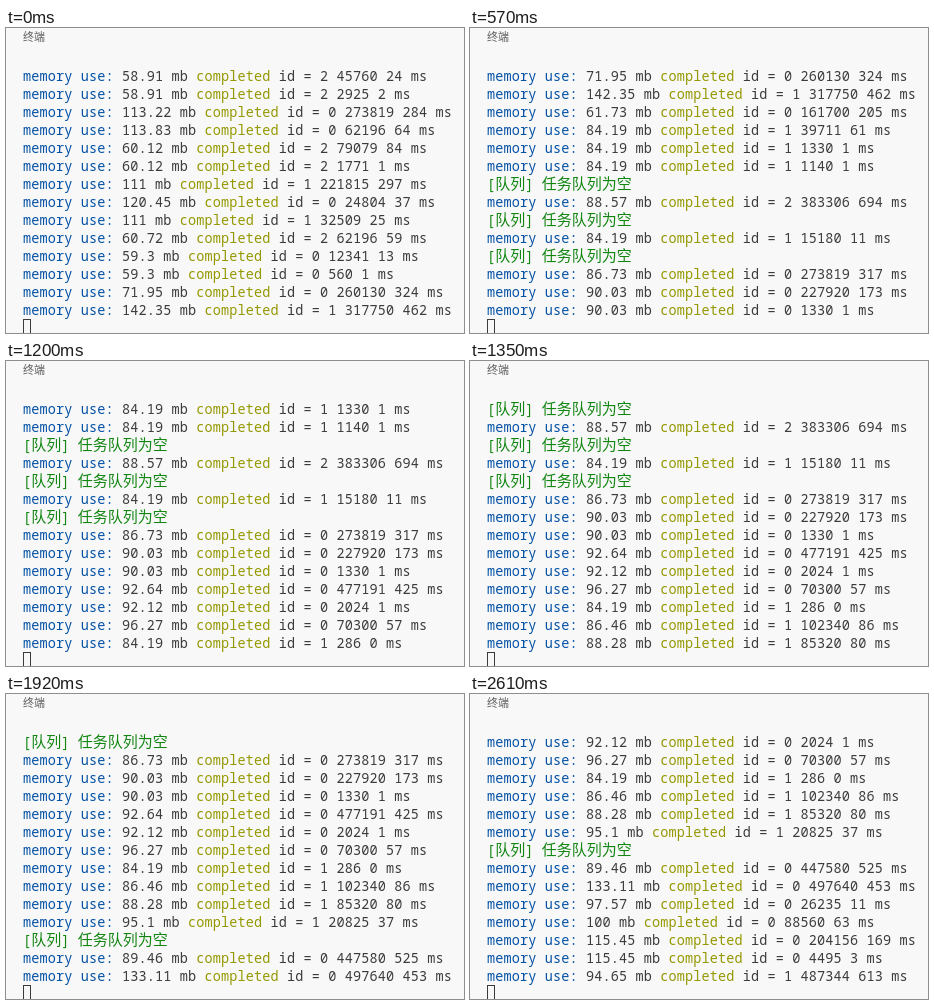
These frames come from a looping animation (458x305 px, 2.64 s). An HTML page with a canvas:

```html
<!DOCTYPE html>
<html lang="zh-CN">
<head>
<meta charset="utf-8">
<title>终端</title>
<style>
  html, body { margin: 0; width: 100%; height: 100%; overflow: hidden; background: #f8f8f8; }
  canvas { display: block; width: 458px; height: 305px; }
</style>
</head>
<body>
<canvas id="stage"></canvas>
<script>
const W = 458, H = 305, LOOP = 2640;
const LEFT = 17, CELL = 8.25, HAN_CELL = 15, ROW = 18, BASE = 53, ROWS = 14;
const SIZE = 13.5;
const MONO = SIZE + 'px "Noto Sans Mono", "DejaVu Sans Mono", monospace';
const HAN = '"Noto Sans CJK SC", "Noto Sans CJK", sans-serif';
const BACK = '#f8f8f8', INK = '#3b3b3b', TITLE = '#5c5c5c';
const BLUE = '#0451a5', OLIVE = '#949800', GREEN = '#118611';

const log = [];
const memory = {};
let now = 0;

const print = (...parts) => log.push({ time: now, parts });
const at = time => { now = time; };
const notice = () => print(['[队列] 任务队列为空', GREEN]);

// A job on n items tries every triple; small jobs take time in proportion.
const triples = n => n * (n - 1) * (n - 2) / 6;
const quickTime = n => Math.ceil(triples(n) / 1700 - 0.2);

// Jobs are [items, ms, mb]; a worker keeps its memory until told otherwise.
function worker(id, ...jobs) {
  for (const [n, ms = quickTime(n), mb = memory[id]] of jobs) {
    memory[id] = mb;
    print(['memory use: ', BLUE], [mb + ' mb ', INK], ['completed ', OLIVE],
      [`id = ${id} ${triples(n)} ${ms} ms`, INK]);
  }
}

worker(2, [66, 24, 58.91], [27]);
worker(0, [119, 284, 113.22], [73, 64, 113.83]);
worker(2, [79, 84, 60.12], [23]);
worker(1, [111, 297, 111]);
worker(0, [54, 37, 120.45]);
worker(1, [59, 25]);
worker(2, [73, 59, 60.72]);
worker(0, [43, 13, 59.3], [16], [117, 324, 71.95]);
worker(1, [125, 462, 142.35]);
at(150);
worker(0, [100, 205, 61.73]);
at(210);
worker(1, [63, 61, 84.19], [21], [20]);
notice();
at(300);
worker(2, [133, 694, 88.57]);
notice();
worker(1, [46, 11]);
notice();
at(360);
worker(0, [119, 317, 86.73]);
at(570);
worker(0, [112, 173, 90.03], [21]);
at(960);
worker(0, [143, 425, 92.64], [24, 1, 92.12]);
at(1020);
worker(0, [76, 57, 96.27]);
at(1200);
worker(1, [13]);
at(1260);
worker(1, [86, 86, 86.46]);
at(1350);
worker(1, [81, 80, 88.28]);
at(1380);
worker(1, [51, 37, 95.1]);
notice();
at(1470);
worker(0, [140, 525, 89.46]);
at(1920);
worker(0, [145, 453, 133.11]);
at(1950);
worker(0, [55, 11, 97.57]);
at(2010);
worker(0, [82, 63, 100]);
at(2160);
worker(0, [108, 169, 115.45], [31]);
at(2610);
worker(1, [144, 613, 94.65]);

const canvas = document.getElementById('stage');
const ctx = canvas.getContext('2d');
const dpr = window.devicePixelRatio || 1;
canvas.width = Math.round(W * dpr);
canvas.height = Math.round(H * dpr);
ctx.scale(dpr, dpr);

function put(text, x, y, color, font) {
  ctx.font = font;
  ctx.fillStyle = color;
  ctx.fillText(text, x, y);
}

// Every character sits in its own terminal cell.
function drawLine({ parts }, row) {
  const y = BASE + row * ROW;
  let x = LEFT;
  for (const [text, color] of parts) {
    for (const char of text) {
      const han = char > '\u2e80';
      put(char, x, y, color, han ? HAN_CELL + 'px ' + HAN : MONO);
      x += han ? HAN_CELL : CELL;
    }
  }
}

function draw(t) {
  ctx.fillStyle = BACK;
  ctx.fillRect(0, 0, W, H);
  put('终端', LEFT, 13, TITLE, '11px ' + HAN);
  log.filter(line => line.time <= t).slice(-ROWS).forEach(drawLine);
  ctx.strokeStyle = INK;
  ctx.strokeRect(LEFT + 0.5, 291.5, 7, 17);
}

const start = performance.now();
function tick() {
  draw((performance.now() - start) % LOOP);
  requestAnimationFrame(tick);
}
tick();
</script>
</body>
</html>
```
